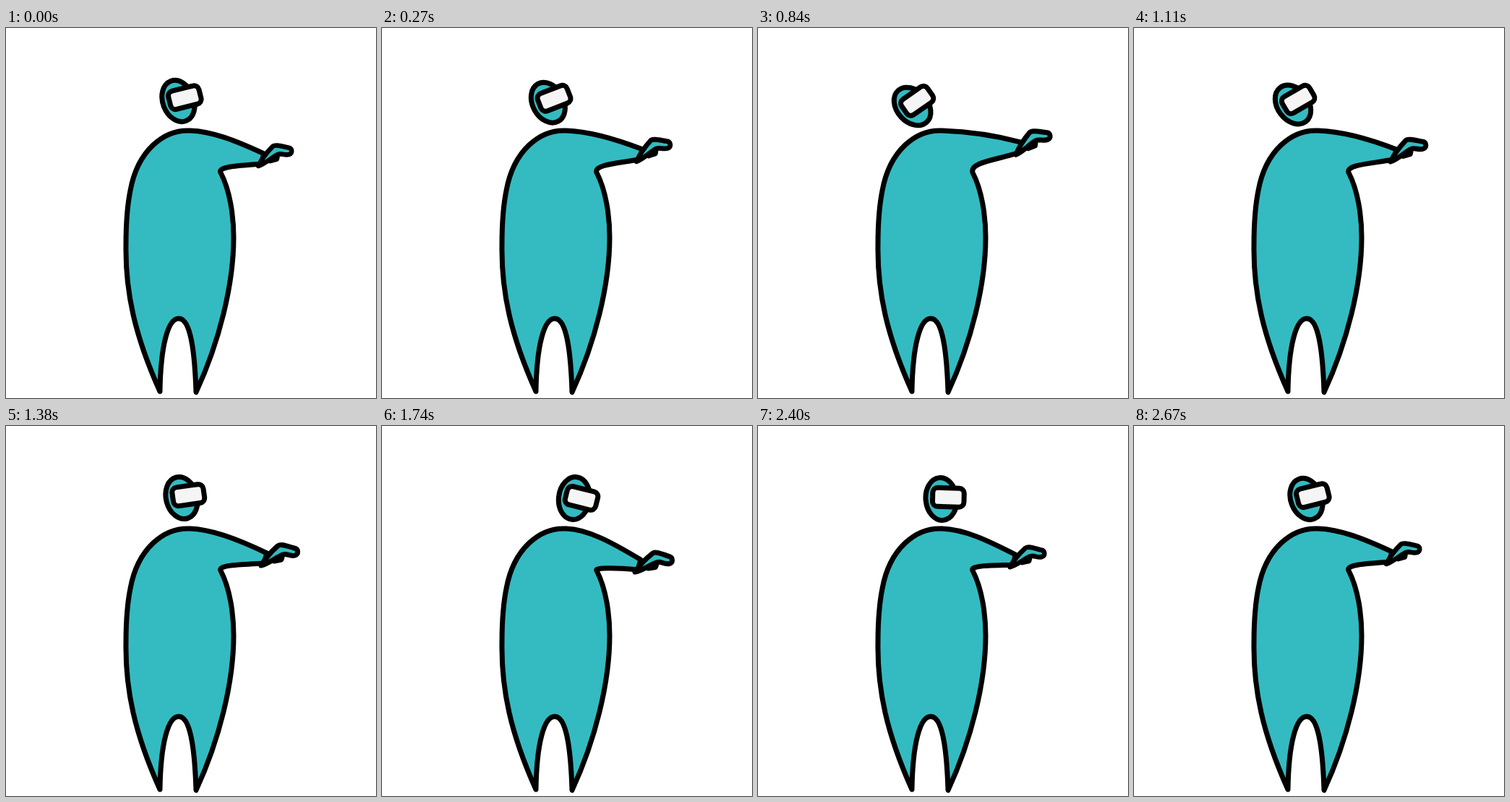
An HTML page that plays this animation: 512 px wide and 512 px high, repeating every 2.7 s.

```html
<!DOCTYPE html>
<html lang="en">
<head>
<meta charset="utf-8">
<title>Headset figure</title>
<style>
  html, body { margin: 0; width: 100%; height: 100%; overflow: hidden; background: #fff; }
  svg { display: block; width: 100%; height: 100%; }
  svg * { stroke: #000; stroke-width: 7; stroke-linejoin: round; stroke-linecap: round; }
  .teal { fill: #33bbc1; }
</style>
</head>
<body>
<svg viewBox="0 0 512 512">
  <path id="body" class="teal"/>
  <g id="hand">
    <path d="M29 -11 L18 -6 L28 -8Z"/>
    <path class="teal" stroke-width="6" d="M0 0C6 -10 15 -20 23 -27C27 -31 38 -26 46 -24C52 -23 52 -15 47 -14C40 -12 36 -17 30 -15C20 -11 10 -2 0 0Z"/>
  </g>
  <g id="head">
    <ellipse class="teal" rx="21.5" ry="29.5" transform="rotate(-7)"/>
    <rect x="-12" y="-15.5" width="43.5" height="26" rx="7" fill="#f5f5f5"/>
  </g>
</svg>
<script>
const LOOP = 2700, STEP = 30;

// time, head x, y, angle, hand x, y, angle, scale
const keys = [
  [0,    238.5, 101,   -14, 349, 191, -4, .94],
  [540,  218,   106.5, -31, 356, 177, -9, 1],
  [800,  213.5, 108.5, -35, 357, 175, -9, 1],
  [1110, 220,   106,   -30, 355, 185, -5, 1],
  [1380, 243,   99.5,  -8,  353, 193, 0,  1],
  [1740, 266,   100,   14,  350, 202, 3,  1],
  [1980, 272.5, 101.5, 22,  349, 205, 4,  .98],
  [2130, 271,   101,   20,  348, 202, 3,  .97],
  [2670, 238.5, 101,   -14, 349, 191, -4, .94],
  [2700, 238.5, 101,   -14, 349, 191, -4, .94]
];

const slope = (i, c) => (keys[i + 1][c] - keys[i][c]) / (keys[i + 1][0] - keys[i][0]);

// Monotone tangent: flat at every turning point and at the loop ends
function tangent(i, c) {
  if (i === 0 || i === keys.length - 1) return 0;
  const a = slope(i - 1, c), b = slope(i, c);
  return a * b > 0 ? 2 * a * b / (a + b) : 0;
}

function pose(time) {
  let i = 0;
  while (time >= keys[i + 1][0]) i++;
  const from = keys[i], to = keys[i + 1], span = to[0] - from[0];
  const u = (time - from[0]) / span, v = 1 - u;
  return from.map((p, c) =>
    p * v * v * (1 + 2 * u) + to[c] * u * u * (3 - 2 * u) +
    span * u * v * (v * tangent(i, c) - u * tangent(i + 1, c)));
}

function bodyPath(x, y) {
  const wristX = x + 8, wristY = y - 17, drop = y - 190;
  return `M213 503C178 425 165 365 166 300C166 270 169 240 172 225C182 170 218 140 255 142
    C285 143 ${wristX - 40} ${147 + (wristY - 157) / 2} ${wristX} ${wristY}
    L${x + 4} ${y - 3}
    C${x - 25} ${190 + drop / 2} 293 ${191 + drop * .4} 297 200
    C310 225 315 260 315 290C315 355 295 435 263 504
    C261 440 254 402 239 402C224 402 214 440 213 503Z`;
}

const [body, hand, head] = ["body", "hand", "head"].map(id => document.getElementById(id));
const place = (part, x, y, angle, scale = 1) =>
  part.setAttribute("transform", `translate(${x} ${y}) rotate(${angle}) scale(${scale})`);

function draw() {
  const time = Math.floor(performance.now() % LOOP / STEP) * STEP;
  const [, headX, headY, headAngle, handX, handY, handAngle, handScale] = pose(time);
  body.setAttribute("d", bodyPath(handX, handY));
  place(hand, handX, handY, handAngle, handScale);
  place(head, headX, headY, headAngle);
  requestAnimationFrame(draw);
}
draw();
</script>
</body>
</html>
```
